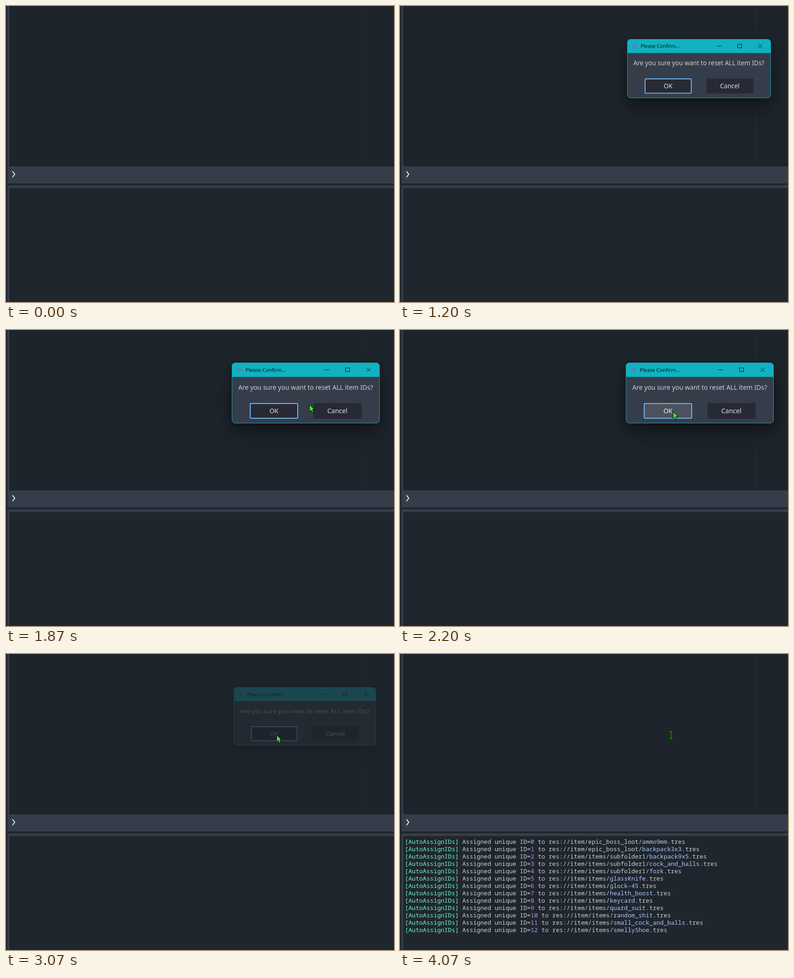
An HTML page for the animation above (8800 ms loop, 842 px wide and 644 px high).

```html
<!DOCTYPE html>
<html lang="en">
<head>
<meta charset="utf-8">
<title>Reset item IDs</title>
<style>
  html, body { margin: 0; width: 100%; height: 100%; overflow: hidden; background: #20252d; }
  svg { position: absolute; left: 0; top: 0; overflow: visible; }
  #dialog {
    position: absolute; left: 490px; top: 71px; width: 321px; height: 132px;
    border-radius: 8px; transform-origin: 107px 36px;
    box-shadow: 0 20px 42px rgba(0,0,0,.42), 0 2px 9px rgba(14,12,18,.25);
  }
  #dialog text { font: 14px "Noto Sans", "Open Sans", sans-serif; fill: #cdcfd2; }
  #dialog .title { font: 11.1px "Open Sans", "Noto Sans", sans-serif; fill: #0a0a0a; }
  #dialog .mid { text-anchor: middle; fill: #dfe0e2; }
  #log {
    position: absolute; left: 10.5px; top: 400px; margin: 0; color: #cdcfd2;
    font: 13px/16px "Noto Sans Mono", "DejaVu Sans Mono", monospace;
  }
  #log b, #log i, #log u { font: inherit; text-decoration: none; }
  #log b { color: #70f7ca; }
  #log i { color: #bb93f2; }
  #log u { color: #abc9ff; }
</style>
</head>
<body>
<svg width="842" height="644">
  <rect width="842" height="644" fill="#20252d"/>
  <g fill="#363d4a">
    <rect x="3" y="-9" width="860" height="395" rx="3"/>
    <rect x="3" y="390" width="860" height="270" rx="3"/>
  </g>
  <rect x="7" y="-9" width="850" height="358" rx="3" fill="#1d242b"/>
  <rect x="773" width="1" height="348" fill="#272d34"/>
  <rect x="7" y="396" width="850" height="270" rx="3" fill="#20262d"/>
  <path d="M14 359.5l5 6.5-5 6.5" fill="none" stroke="#f0f0f2" stroke-width="1.9"/>
</svg>

<pre id="log"></pre>

<div id="dialog">
  <svg width="321" height="132">
    <g id="content">
      <path d="M0 30H321V124a8 8 0 0 1-8 8H8a8 8 0 0 1-8-8Z" fill="#363d4a"/>
      <text x="14" y="59">Are you sure you want to reset ALL item IDs?</text>
      <rect id="ok" x="40" y="89" width="103" height="32" rx="2" stroke="#70b5f5" stroke-width="2"/>
      <text id="okText" class="mid" x="91.5" y="110">OK</text>
      <rect x="177" y="88" width="105" height="34" rx="3" fill="#272a34"/>
      <text class="mid" x="229" y="110">Cancel</text>
    </g>
    <path d="M0 31V8a8 8 0 0 1 8-8H313a8 8 0 0 1 8 8V31Z" fill="#11b2c0"/>
    <rect id="edge" x=".5" y=".5" width="320" height="131" rx="7.5" fill="none"/>
    <circle cx="17" cy="15.5" r="6" fill="#478cbf"/>
    <text class="title" x="30" y="20">Please Confirm...</text>
    <path d="M201 15.5h10M246.5 11.5h9v8h-9ZM292.5 11l9 9M301.5 11l-9 9" fill="none" stroke="#0c1214"/>
  </svg>
</div>

<svg width="842" height="644">
  <path id="arrow" d="M.5 .5V15.5L4 12.2 6.3 17.8 9 16.6 6.8 11.2 11 10.8Z" fill="#3cff14" stroke="#000"/>
  <g id="beam" fill="none">
    <path d="M583 168.5h10M583 184.5h10M588 168v17" stroke="#061006" stroke-width="3"/>
    <path d="M583.5 168.5h9M583.5 184.5h9M588 168v17" stroke="#35d81c" stroke-width="1.2"/>
  </g>
</svg>

<script>
const $ = id => document.getElementById(id);
const LOOP = 8800, OPEN = 1130, PAINTED = 1200, HOVER = 1930, PRESS = 2800, DONE = 4070;

// [time, scale, opacity]
const zoom = [
  [OPEN, .922, .6], [PAINTED, .972, 1], [1270, .991, 1], [1330, .998, 1], [1400, 1, 1],
  [2930, .99, .82], [3000, .975, .5], [3060, .962, .24], [3130, .95, .06]
];
// [time, x, y]
const moves = [
  [1730, 817, 129], [1800, 737, 147], [1870, 658, 162], [HOVER, 622, 169],
  [2000, 606, 173], [2070, 598, 175], [2130, 594, 176], [2200, 592, 177],
  [2400, 590, 177], [2470, 588, 176], [2600, 587, 176]
];
const files = [
  "epic_boss_loot/ammo9mm", "epic_boss_loot/backpack3x3", "items/subfolder1/backpack9x5",
  "items/subfolder1/cock_and_balls", "items/subfolder1/fork", "items/glassKnife",
  "items/glock-45", "items/health_boost", "items/keycard", "items/quard_suit",
  "items/random_shit", "items/small_cock_and_balls", "items/smellyShoe"
];

$("log").innerHTML = files.map((path, id) => {
  const cut = path.lastIndexOf("/") + 1;
  return `<b>[AutoAssignIDs]</b> Assigned unique ID=<i>${id}</i> to res://item/` +
    `${path.slice(0, cut)}<u>${path.slice(cut)}</u>.tres`;
}).join("\n");

const latest = (steps, t) => steps.filter(s => s[0] <= t).pop();
const show = (id, on) => $(id).style.visibility = on ? "visible" : "hidden";

function draw() {
  const t = performance.now() % LOOP;
  const [, scale, opacity] = latest(zoom, t) || zoom[0];
  const [, x, y] = latest(moves, t) || moves[0];

  show("dialog", t >= OPEN && t < DONE);
  show("content", t >= PAINTED && t < DONE);
  $("dialog").style.transform = `scale(${scale})`;
  $("dialog").style.opacity = opacity;
  $("edge").setAttribute("stroke", t < PAINTED ? "#6b9a98" : "#11a9b8");

  const state = t < HOVER ? 0 : t < PRESS ? 1 : 2;
  $("ok").setAttribute("fill", ["#272a34", "#4c525d", "#20252d"][state]);
  $("okText").style.fill = ["#dfe0e2", "#f2f2f2", "#70b5f5"][state];

  show("arrow", t >= moves[0][0] && t < DONE);
  $("arrow").setAttribute("transform", `translate(${x} ${y})`);
  show("beam", t >= DONE);
  show("log", t >= DONE);
  requestAnimationFrame(draw);
}
draw();
</script>
</body>
</html>
```
